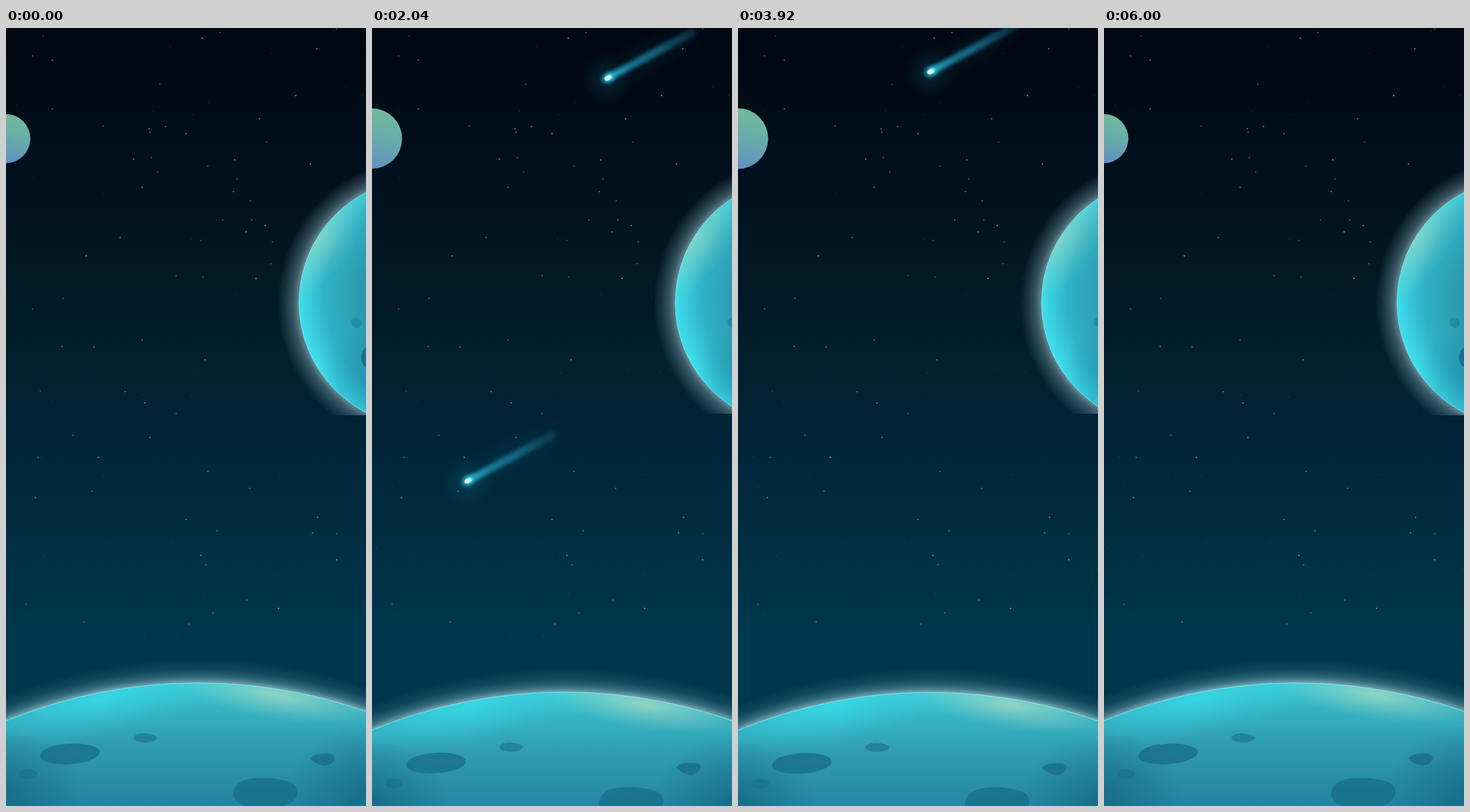
Recreate the animation shown at these times as an HTML page. Size 509 by 1101 pixels, loop 6040 ms.

```html
<!DOCTYPE html>
<html lang="en">
<head>
<meta charset="utf-8">
<title>Night sky with planets and comets</title>
<style>
  html, body { margin: 0; width: 100%; height: 100%; overflow: hidden; background: #010b16; }
  svg { display: block; width: 100%; height: 100%; }
</style>
</head>
<body>
<svg viewBox="0 0 509 1101" preserveAspectRatio="none">
  <defs>
    <linearGradient id="sky" x1="0" y1="0" x2="0" y2="1">
      <stop offset="0" stop-color="#010712"/>
      <stop offset=".12" stop-color="#010d18"/>
      <stop offset=".27" stop-color="#011522"/>
      <stop offset=".42" stop-color="#021f2c"/>
      <stop offset=".52" stop-color="#012437"/>
      <stop offset=".65" stop-color="#012d41"/>
      <stop offset=".77" stop-color="#01374c"/>
      <stop offset=".86" stop-color="#01374d"/>
      <stop offset="1" stop-color="#013044"/>
    </linearGradient>

    <linearGradient id="smallFill" x1=".6" y1="0" x2=".4" y2="1">
      <stop offset="0" stop-color="#72b99c"/>
      <stop offset=".45" stop-color="#68acaa"/>
      <stop offset="1" stop-color="#5f8fc2"/>
    </linearGradient>

    <radialGradient id="bigHalo" gradientUnits="userSpaceOnUse" cx="589.6" cy="388.5" r="206">
      <stop offset=".85" stop-color="#a2ccd6" stop-opacity=".62"/>
      <stop offset=".89" stop-color="#8db4c0" stop-opacity=".4"/>
      <stop offset=".95" stop-color="#7fa6b3" stop-opacity=".18"/>
      <stop offset="1" stop-color="#7fa6b3" stop-opacity="0"/>
    </radialGradient>
    <radialGradient id="bigFill" gradientUnits="userSpaceOnUse" cx="605" cy="380" r="193">
      <stop offset=".3" stop-color="#2484a0"/>
      <stop offset=".58" stop-color="#2d9eb3"/>
      <stop offset=".8" stop-color="#2fb2c6"/>
      <stop offset="1" stop-color="#40e0ee"/>
    </radialGradient>
    <radialGradient id="bigPale" gradientUnits="userSpaceOnUse" cx="0" cy="0" r="1"
        gradientTransform="translate(440 300) rotate(-55) scale(110 48)">
      <stop offset="0" stop-color="#a6d6ba" stop-opacity=".62"/>
      <stop offset="1" stop-color="#8fcfc0" stop-opacity="0"/>
    </radialGradient>
    <radialGradient id="bigDark" gradientUnits="userSpaceOnUse" cx="525" cy="500" r="85">
      <stop offset="0" stop-color="#1a7c9c" stop-opacity=".6"/>
      <stop offset="1" stop-color="#1a7c9c" stop-opacity="0"/>
    </radialGradient>
    <clipPath id="haloCut"><rect id="haloBox" x="360" y="190" width="240" height="358"/></clipPath>

    <radialGradient id="lowHalo" gradientUnits="userSpaceOnUse" cx="272" cy="1644.5" r="752">
      <stop offset=".954" stop-color="#a4d6de" stop-opacity=".72"/>
      <stop offset=".965" stop-color="#7ab4c2" stop-opacity=".42"/>
      <stop offset=".98" stop-color="#5f9fb0" stop-opacity=".16"/>
      <stop offset="1" stop-color="#5f9fb0" stop-opacity="0"/>
    </radialGradient>
    <linearGradient id="lowFill" gradientUnits="userSpaceOnUse" x1="0" y1="926" x2="0" y2="1101">
      <stop offset="0" stop-color="#3accd9"/>
      <stop offset=".2" stop-color="#35b4c4"/>
      <stop offset=".5" stop-color="#2f9cb2"/>
      <stop offset="1" stop-color="#25839f"/>
    </linearGradient>
    <radialGradient id="lowPale" gradientUnits="userSpaceOnUse" cx="0" cy="0" r="1"
        gradientTransform="translate(385 944) rotate(9) scale(150 36)">
      <stop offset="0" stop-color="#b4dcc0" stop-opacity=".72"/>
      <stop offset="1" stop-color="#92cfc0" stop-opacity="0"/>
    </radialGradient>
    <radialGradient id="lowCyan" gradientUnits="userSpaceOnUse" cx="0" cy="0" r="1"
        gradientTransform="translate(130 950) rotate(-11) scale(190 52)">
      <stop offset="0" stop-color="#36deeb" stop-opacity=".75"/>
      <stop offset="1" stop-color="#36d0e0" stop-opacity="0"/>
    </radialGradient>
    <radialGradient id="lowDark">
      <stop offset="0" stop-color="#0e5a78" stop-opacity=".62"/>
      <stop offset="1" stop-color="#0e5a78" stop-opacity="0"/>
    </radialGradient>
    <clipPath id="lowCut"><circle cx="272" cy="1644.5" r="718"/></clipPath>

    <linearGradient id="tailFill" gradientUnits="userSpaceOnUse" x1="0" y1="0" x2="144" y2="0">
      <stop offset="0" stop-color="#2bbad6" stop-opacity=".95"/>
      <stop offset=".25" stop-color="#1c8cab" stop-opacity=".8"/>
      <stop offset=".65" stop-color="#176f8e" stop-opacity=".66"/>
      <stop offset="1" stop-color="#125a78" stop-opacity=".3"/>
    </linearGradient>
    <radialGradient id="aura">
      <stop offset="0" stop-color="#1a9cbc" stop-opacity=".4"/>
      <stop offset=".4" stop-color="#14708c" stop-opacity=".14"/>
      <stop offset="1" stop-color="#14708c" stop-opacity="0"/>
    </radialGradient>
    <radialGradient id="headGlow">
      <stop offset="0" stop-color="#e8ffff"/>
      <stop offset=".25" stop-color="#8cf0f8" stop-opacity=".95"/>
      <stop offset=".5" stop-color="#25b4d0" stop-opacity=".6"/>
      <stop offset="1" stop-color="#1487a6" stop-opacity="0"/>
    </radialGradient>
    <filter id="soft" x="-20%" y="-100%" width="140%" height="300%">
      <feGaussianBlur stdDeviation="2.6"/>
    </filter>

    <g id="comet" transform="rotate(-28.4)">
      <ellipse cx="65" rx="105" ry="30" fill="url(#aura)" opacity=".45"/>
      <circle r="36" fill="url(#aura)"/>
      <path d="M-4 0Q-1-5 6-5L138-6Q146 0 138 6L6 5Q-1 5-4 0Z" fill="url(#tailFill)" filter="url(#soft)"/>
      <ellipse cx="2" rx="14" ry="10" fill="url(#headGlow)"/>
      <ellipse rx="4.5" ry="3" fill="#dcffff"/>
    </g>
  </defs>

  <rect width="509" height="1101" fill="url(#sky)"/>
  <g id="stars" fill="#9cc0c0"></g>
  <g id="comets"></g>

  <circle id="small" cx="-.3" cy="156.5" r="34.8" fill="url(#smallFill)"/>

  <g id="big">
    <g clip-path="url(#haloCut)">
      <circle cx="589.6" cy="388.5" r="206" fill="url(#bigHalo)"/>
    </g>
    <g id="bigDisc">
      <circle cx="589.6" cy="388.5" r="175.6" fill="url(#bigFill)"/>
      <circle cx="589.6" cy="388.5" r="175.6" fill="url(#bigDark)"/>
      <circle cx="589.6" cy="388.5" r="175.6" fill="url(#bigPale)"/>
      <circle cx="589.6" cy="388.5" r="175.2" fill="none" stroke="#8eeaec" stroke-opacity=".6"/>
      <path d="M488 415Q490 409 496 410Q503 412 503 419Q501 426 494 424Q488 421 488 415Z" fill="#1f87a2" opacity=".75"/>
      <path d="M502 465Q504 451 516 449Q530 452 530 468Q526 484 513 482Q502 478 502 465Z" fill="#16698a" opacity=".85"/>
    </g>
  </g>

  <g id="low">
    <circle cx="272" cy="1644.5" r="752" fill="url(#lowHalo)"/>
    <g clip-path="url(#lowCut)">
      <rect y="920" width="509" height="190" fill="url(#lowFill)"/>
      <rect y="920" width="509" height="190" fill="url(#lowCyan)"/>
      <rect y="920" width="509" height="190" fill="url(#lowPale)"/>
      <ellipse cx="-10" cy="1085" rx="120" ry="95" fill="url(#lowDark)"/>
      <ellipse cx="525" cy="1085" rx="130" ry="100" fill="url(#lowDark)"/>
    </g>
    <circle cx="272" cy="1644.5" r="717.6" fill="none" stroke="#a4eeee" stroke-opacity=".65"/>
    <g fill="#1a708e" fill-opacity=".85">
      <path d="M48 1030Q52 1017 78 1014Q110 1010 127 1018Q137 1024 129 1031Q112 1042 82 1042Q50 1041 48 1030Z"/>
      <path d="M180 1004Q183 998 195 998Q209 999 214 1004Q213 1010 198 1011Q181 1011 180 1004Z" opacity=".7"/>
      <path d="M18 1056Q21 1049 31 1049Q43 1050 44 1055Q42 1063 30 1063Q19 1062 18 1056Z" opacity=".85"/>
      <path d="M430 1034Q434 1027 448 1027Q464 1026 465 1032Q463 1043 450 1044Q438 1042 430 1034Z"/>
      <path d="M321 1084Q323 1066 347 1062Q378 1059 402 1067Q416 1075 411 1087Q404 1104 368 1105Q322 1104 321 1084Z"/>
      <path d="M482 1098Q484 1090 499 1089Q512 1089 518 1096V1106H484Z" opacity=".8"/>
    </g>
  </g>
</svg>

<script>
const NS = 'http://www.w3.org/2000/svg';
const LOOP = 6040, STEP = 40, TURN = 3000;
const $ = id => document.getElementById(id);

function add(parent, tag, attrs) {
  const el = document.createElementNS(NS, tag);
  for (const key in attrs) el.setAttribute(key, attrs[key]);
  return parent.appendChild(el);
}

// x, y pairs of the brighter stars
const STARS = [
  52,11, 65,45, 439,29, 467,1, 277,14, 37,39, 217,79, 409,95, 302,6,
  65,114, 137,138, 202,142, 203,147, 225,139, 254,149, 368,161, 358,128, 430,192, 285,195,
  180,185, 205,183, 214,203, 323,186, 326,213, 321,231, 345,244, 192,225, 306,271, 347,271,
  366,279, 275,300, 161,296, 339,288, 376,302, 113,322, 374,333, 278,352, 353,354, 240,350,
  80,382, 37,397, 192,441, 79,450, 124,451, 281,469, 48,513, 168,514, 196,530,
  240,545, 203,579, 94,576, 45,607, 130,607, 285,627, 121,655, 344,651, 41,664, 254,695,
  298,711, 440,692, 467,715, 433,714, 275,746, 282,759, 467,752, 28,815, 292,827, 385,821,
  340,809, 110,840, 258,843
];
for (let i = 0; i < STARS.length; i += 2) {
  add($('stars'), 'circle', {
    cx: STARS[i] + .5, cy: STARS[i + 1] + .5, r: .85 + (i % 3) * .08, opacity: .5 + (i % 5) * .08
  });
}

let seed = 17;
const random = () => (seed = seed * 16807 % 2147483647) / 2147483647;
for (let i = 0; i < 45; i++) {
  add($('stars'), 'circle', { cx: random() * 509, cy: random() * 900, r: .7, opacity: .22 });
}

// Each comet passes x, y at time t
const VX = -.38, VY = .2048, TAIL = 220;
const comets = [
  { t: 800, x: 227, y: 217 },
  { t: 2040, x: 333, y: 71 },
  { t: 2040, x: 135, y: 641 },
  { t: 2880, x: 257, y: 488 },
  { t: 3920, x: 272, y: 62 }
];
for (const c of comets) c.el = add($('comets'), 'use', { href: '#comet' });

const move = (el, x, y) => el.setAttribute('transform', `translate(${x} ${y})`);

function draw(time) {
  const t = Math.floor(time % LOOP / STEP) * STEP;
  const u = Math.max(0, 1 - Math.abs(t - TURN) / TURN);

  move($('big'), 21.4 * u, 0);
  $('haloBox').setAttribute('height', 358 - 3 * u);
  move($('low'), 0, 19.3 * u);
  $('small').setAttribute('r', 34.8 + 11.8 * u);

  for (const c of comets) {
    const x = c.x + VX * (t - c.t), y = c.y + VY * (t - c.t);
    const seen = x > -TAIL && x < 530 && y > -60;
    c.el.setAttribute('visibility', seen ? 'visible' : 'hidden');
    if (seen) move(c.el, x, y);
  }
}

const start = performance.now();
function tick() {
  draw(performance.now() - start);
  requestAnimationFrame(tick);
}
tick();
</script>
</body>
</html>
```
